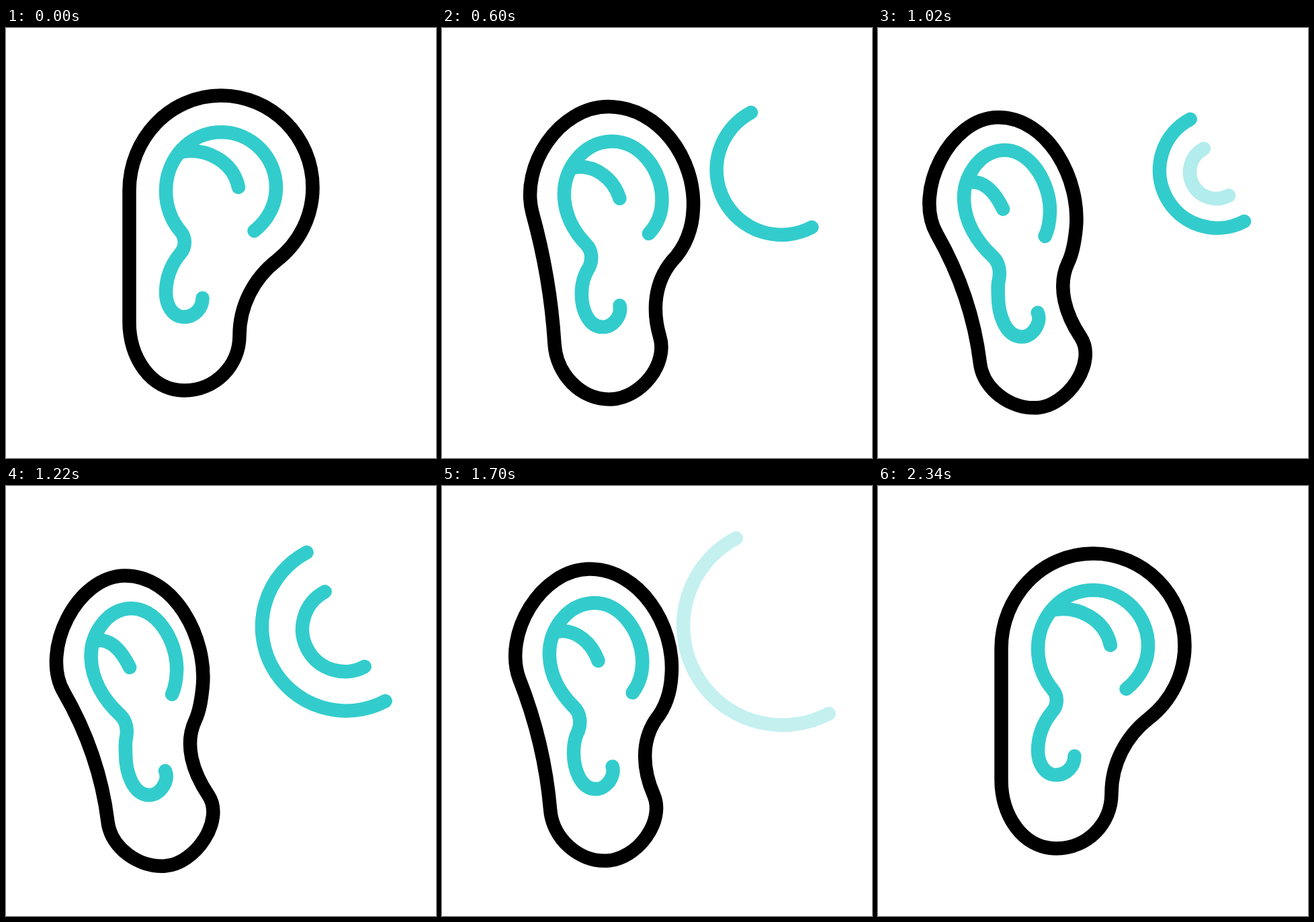
Recreate the animation shown at these times as an HTML page. Size 640 by 640 pixels, loop 2.4 s.

```html
<!DOCTYPE html>
<html lang="en">
<head>
<meta charset="utf-8">
<title>Listening ear</title>
<style>
html, body { margin: 0; width: 100%; height: 100%; overflow: hidden; background: #fff; }
svg { display: block; width: 100%; height: 100%; }
path { fill: none; stroke: #3cc; stroke-width: 20.5; stroke-linecap: round; stroke-linejoin: round; }
#rim { stroke: #000; }
</style>
</head>
<body>
<svg viewBox="0 0 640 640">
  <g id="waves"></g>
  <path id="rim"/>
  <path id="fold"/>
  <path id="ridge"/>
</svg>
<script>
const LOOP = 2400, WAVE_TIME = 860;
const clamp = v => Math.min(1, Math.max(0, v));
const mix = (a, b, k) => a + (b - a) * k;
const smooth = u => u * u * (3 - 2 * u);

// Key points: [x, y, heading in degrees], first at rest, then leaning.
const rim = [
  [[183.5, 242, -90], [86, 307, -120]],
  [[320, 100.5, 0], [177, 133.5, 0]],
  [[456.5, 237.5, 90], [292.5, 300, 96]],
  [[403, 346, 142], [281.5, 349, 115]],
  [[347.5, 458, 90], [301, 460, 56]],
  [[265.5, 539.5, 180], [237, 565.5, 176]],
  [[183.5, 438, 270], [151.5, 500, 263]]
];
const fold = [
  [[369.5, 302, -38], [247, 310, -65]],
  [[402, 238, -90], [254, 275, -88]],
  [[320, 155, 180], [181, 182.5, 173]],
  [[238, 242, 90], [126.5, 256, 88]],
  [[260, 303, 50], [170, 341, 43]],
  [[260, 335, 130], [178.5, 377, 102]],
  [[238, 394, 90], [178, 398, 90]],
  [[265, 430, 0], [214, 460, 0]],
  [[292.5, 402, -90], [237, 424, -115]]
];
const ridge = [
  [[258, 185, -12], [136, 230, -5]],
  [[346, 237, 78], [184, 270, 64]]
];

// Cubic from a to b; handles follow the circular arc rule, up to a limit.
function segment([ax, ay, ad], [bx, by, bd], limit) {
  const rad = Math.PI / 180;
  const turn = Math.abs(Math.cos((bd - ad) * rad / 2));
  const h = Math.hypot(bx - ax, by - ay) * Math.min(limit, 2 / (3 * (1 + turn)));
  return [
    ax + h * Math.cos(ad * rad), ay + h * Math.sin(ad * rad),
    bx - h * Math.cos(bd * rad), by - h * Math.sin(bd * rad),
    bx, by
  ];
}

function trace(keys, pose) {
  const nodes = keys.map(key => key[pose]);
  const limit = pose ? 0.365 : 0.4;
  return nodes.slice(1).reduce(
    (out, node, i) => out.concat(segment(nodes[i], node, limit)),
    nodes[0].slice(0, 2));
}

const shapes = Object.entries({ rim: [...rim, rim[0]], fold, ridge }).map(([id, keys]) => ({
  el: document.getElementById(id),
  end: id === 'rim' ? 'Z' : '',
  rest: trace(keys, 0),
  bent: trace(keys, 1)
}));

const waves = [168, 641, 963].map(start => {
  const el = document.createElementNS('http://www.w3.org/2000/svg', 'path');
  document.getElementById('waves').append(el);
  return { start, el };
});

// Cubic bezier easing (a, 0, 1 - a, 1)
function ease(u, a = 0.76) {
  u = clamp(u);
  let lo = 0, hi = 1;
  for (let i = 0; i < 24; i++) {
    const s = (lo + hi) / 2, q = 1 - s;
    const x = 3 * a * s * q * q + 3 * (1 - a) * s * s * q + s * s * s;
    if (x < u) lo = s; else hi = s;
  }
  return smooth(lo);
}

const lean = t => ease((t - 20) / 1160) - ease((t - 1186) / 1160);

function drawShape({ el, end, rest, bent }, k) {
  const p = rest.map((v, i) => mix(v, bent[i], k).toFixed(2));
  el.setAttribute('d', `M${p[0]} ${p[1]}C${p.slice(2).join(' ')}${end}`);
}

function drawWave({ start, el }, t) {
  const u = (t - start) / WAVE_TIME;
  const alpha = clamp(u / 0.18) * clamp((0.93 - u) / 0.25);
  const r = mix(38, 154, smooth(clamp(u)));
  const cx = 504 + (r - 56) * 0.03, cy = 213.5 - (r - 56) * 0.058;
  const dx = r * 0.468, dy = r * 0.884;
  el.setAttribute('opacity', alpha.toFixed(3));
  el.setAttribute('d', `M${cx - dx} ${cy - dy}A${r} ${r} 0 0 0 ${cx + dx} ${cy + dy}`);
}

function draw(t) {
  const k = lean(t);
  shapes.forEach(s => drawShape(s, k));
  waves.forEach(w => drawWave(w, t));
}

const begin = performance.now();
function tick() {
  draw((performance.now() - begin) % LOOP);
  requestAnimationFrame(tick);
}
draw(0);
requestAnimationFrame(tick);
</script>
</body>
</html>
```
